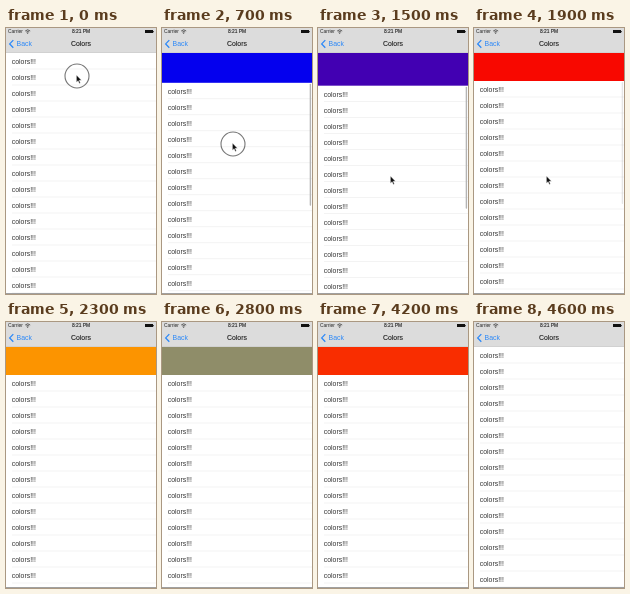
These frames come from a looping animation (150x266 px, 5000 ms). An HTML page:

```html
<!DOCTYPE html>
<html lang="en">
<head>
<meta charset="utf-8">
<title>Pull to refresh</title>
<style>
  html, body { margin: 0; width: 100%; height: 100%; overflow: hidden; background: #fff; }
  svg { display: block; width: 100vw; height: 100vh; }
  text { font-family: "Liberation Sans", Arial, sans-serif; font-size: 6.9px; }
  .soft { filter: blur(.35px); }
  .status { font-size: 4.9px; fill: #222; }
</style>
</head>
<body>
<svg viewBox="0 0 150 266" preserveAspectRatio="none">
  <rect width="150" height="266" fill="#fff"/>
  <rect id="band" y="25" width="150" height="0"/>
  <g id="list"></g>
  <rect id="bar" x="147.7" width="1.4" height="122" rx=".7" fill="#b4b4b4"/>

  <rect width="150" height="25" fill="#dcdcdc"/>
  <rect y="24.5" width="150" height=".5" fill="#c4c4c4"/>
  <g class="soft">
    <text class="status" x="2" y="5.4">Carrier</text>
    <g fill="none" stroke="#222" stroke-width=".7">
      <path d="M19.2 3a3.6 3.6 0 0 1 5 0M20.3 4.1a2 2 0 0 1 2.8 0"/>
      <circle cx="21.7" cy="5.1" r=".3"/>
    </g>
    <path d="M139 2h8v3h-8zM147.3 3h.7v1.2h-.7z" fill="#111"/>
    <text class="status" x="75" y="5.4" text-anchor="middle" stroke="#222" stroke-width=".12">8:21 PM</text>
    <path d="M7.3 12.1L3.7 15.9L7.3 19.7" fill="none" stroke="#2b88f8" stroke-width="1.3"/>
    <text x="10.6" y="18.4" fill="#2b88f8">Back</text>
    <text x="75" y="18.4" text-anchor="middle" fill="#222" stroke="#222" stroke-width=".12">Colors</text>
  </g>
  <rect y="265" width="150" height="1" fill="#a0a0a0"/>

  <g id="pointer">
    <circle id="ring" r="12" fill="none" stroke="#777" stroke-width="1.1"/>
    <path d="M-.6 -1v7.2l1.7-1.5 1.2 2.7 1.1-.5-1.2-2.6h2.3z" fill="#111" stroke="#fff" stroke-width=".4"/>
  </g>
</svg>
<script>
const LOOP = 5000, STEP = 100, TOP = 25, ROW = 16, REST = 28;
const RELEASE = 1250, CLOSE = 4200, CYCLE = 2190, CYCLE_START = 1145;
const BLUE = [4, 0, 238];
const COLORS = [BLUE, [248, 0, 0], [252, 127, 0], [252, 252, 0], BLUE];
const $ = id => document.getElementById(id);
const mix = (a, b, p) => a + (b - a) * p;
const span = (t, a, b) => Math.min(1, Math.max(0, (t - a) / (b - a)));
const smooth = p => (1 - Math.cos(Math.PI * p)) / 2;

let lines = "", labels = "";
for (let i = 0; i < 15; i++) {
  const y = TOP + i * ROW;
  labels += `<text x="5.8" y="${y + 10.9}" fill="#333">colors!!!</text>`;
  lines += `<rect x="6" y="${y + ROW - .3}" width="144" height=".6" fill="#ececec"/>`;
}
$("list").innerHTML = `${lines}<g class="soft">${labels}</g>`;

// Pointer position as [time, x, y] stops.
const PATH = [[0, 71, 48], [700, 71, 116], [1200, 73, 149]];
function pointerAt(t) {
  const [a, b] = t < PATH[1][0] ? PATH : PATH.slice(1);
  const p = span(t, a[0], b[0]);
  return { x: mix(a[1], b[1], p), y: mix(a[2], b[2], p) };
}

// Rubber-band resistance while dragging past the top.
function rubber(drag) {
  const d = 241;
  return d * (1 - 1 / (drag * .5 / d + 1));
}

function pull(t) {
  if (t >= CLOSE) return REST * (1 - span(t, CLOSE, 4600)) ** 2;
  const dragged = rubber(pointerAt(t).y - PATH[0][2]);
  return mix(REST, dragged, (1 - span(t, RELEASE, 1850)) ** 2);
}

function bandColor(t) {
  const p = t < CYCLE_START ? 0 : (t - CYCLE_START) % CYCLE / CYCLE;
  const k = smooth(p) * (COLORS.length - 1), i = Math.min(3, Math.floor(k));
  return `rgb(${COLORS[i].map((c, n) => Math.round(mix(c, COLORS[i + 1][n], k - i)))})`;
}

function draw(t) {
  const off = pull(t), { x, y } = pointerAt(t);
  $("band").setAttribute("height", off);
  $("band").setAttribute("fill", bandColor(t));
  $("list").setAttribute("transform", `translate(0 ${off})`);
  $("bar").setAttribute("y", TOP + off + 1);
  $("bar").setAttribute("opacity", span(t, 0, 200) * (1 - span(t, 1700, 2000)));
  $("pointer").setAttribute("transform", `translate(${x} ${y})`);
  $("pointer").setAttribute("opacity", t < 2000 ? 1 : 0);
  $("ring").setAttribute("opacity", t < RELEASE ? 1 : 0);
}

const start = performance.now();
function tick() {
  const t = (performance.now() - start) % LOOP;
  draw(Math.floor(t / STEP) * STEP);
  requestAnimationFrame(tick);
}
tick();
</script>
</body>
</html>
```
